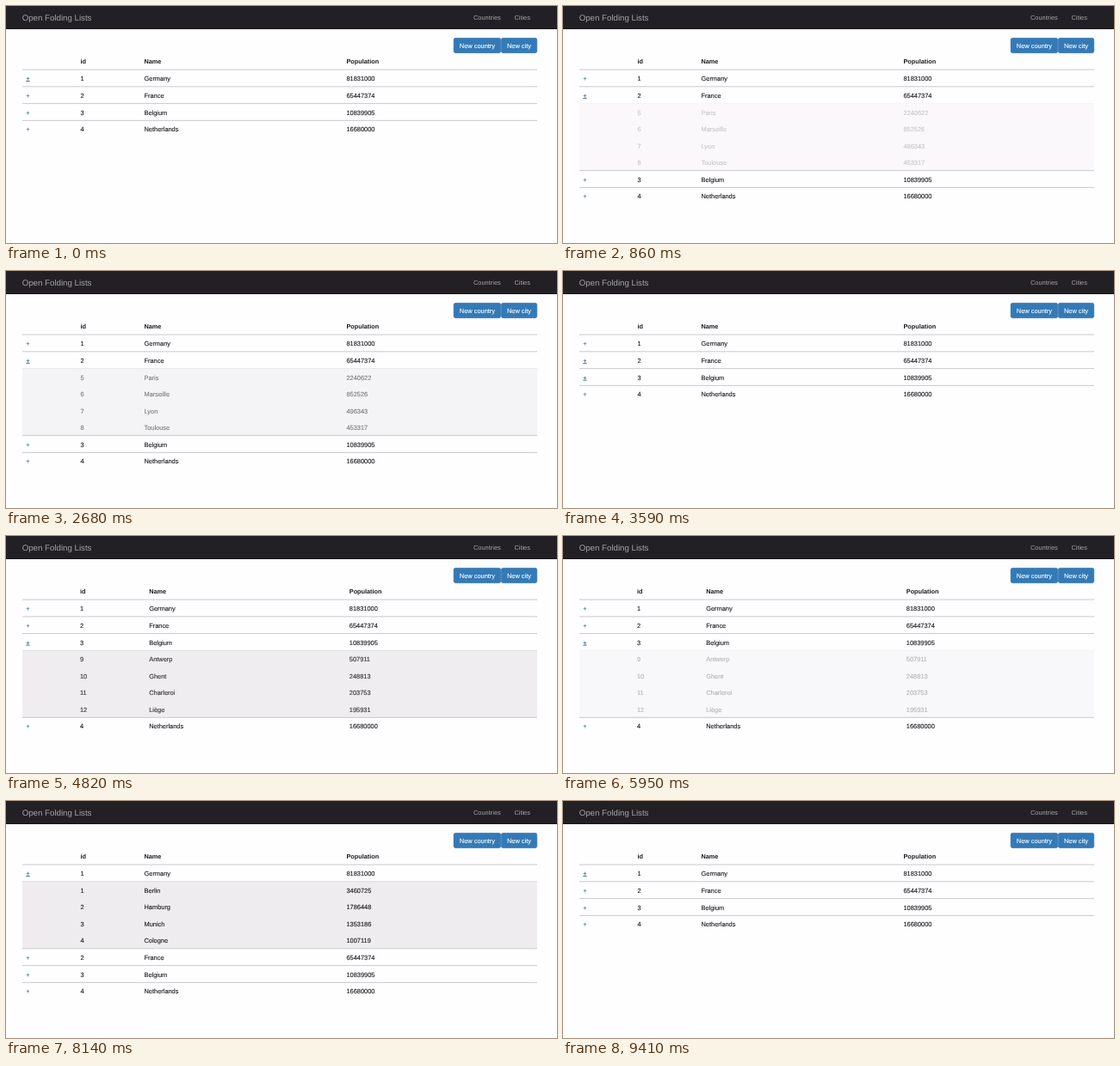
An HTML page that plays this animation: 640x276 px, repeating every 9.72 s.

```html
<!DOCTYPE html>
<html lang="en">
<head>
<meta charset="utf-8">
<title>Folding table</title>
<style>
  html, body { margin: 0; width: 100%; height: 100%; overflow: hidden; background: #fefdff; }
  svg { display: block; width: 100%; height: 100%; }
  text {
    font: 7.42px "Liberation Sans", Arial, sans-serif;
    fill: #1c1b1d; stroke: #1c1b1d; stroke-width: 0.12;
    text-rendering: geometricPrecision; white-space: pre;
  }
  .head { font-size: 7.3px; font-weight: bold; stroke: none; }
  .nav { fill: #a5a4a6; stroke: none; }
  .brand { font-size: 9.7px; }
  .label { fill: #fff; stroke: #fff; text-anchor: middle; }
  .link { fill: #35708a; stroke: #35708a; }
  .active { fill: #23527c; stroke: #23527c; }
</style>
</head>
<body>
<svg id="stage" viewBox="0 0 640 276"></svg>
<script>
const LOOP = 9720, FADE = 400;
const LEFT = 19, WIDTH = 598, TOP = 74, ROW = 19.75, SUBROW = 19.5, BASE = 13;

const countries = [
  { cells: [1, 'Germany', 81831000], cities: [
    [1, 'Berlin', 3460725], [2, 'Hamburg', 1786448], [3, 'Munich', 1353186], [4, 'Cologne', 1007119]],
    open: 7270, close: 8860, active: [[0, 730], [6550, LOOP]] },
  { cells: [2, 'France', 65447374], cities: [
    [5, 'Paris', 2240622], [6, 'Marseille', 852526], [7, 'Lyon', 496343], [8, 'Toulouse', 453317]],
    open: 730, close: 2500, active: [[50, 4270]] },
  { cells: [3, 'Belgium', 10839905], cities: [
    [9, 'Antwerp', 507911], [10, 'Ghent', 248813], [11, 'Charleroi', 203753], [12, 'Liège', 195931]],
    open: 4500, close: 5730, fadeOut: 360, wide: true, active: [[3360, 7270]] },
  { cells: [4, 'Netherlands', 16680000], cities: [], active: [] }
];

const stage = document.getElementById('stage');
const columns = [];

function add(parent, tag, attrs, content) {
  const el = document.createElementNS('http://www.w3.org/2000/svg', tag);
  for (const key in attrs) el.setAttribute(key, attrs[key]);
  if (content !== undefined) el.textContent = content;
  parent.appendChild(el);
  return el;
}

const rect = (parent, x, y, width, height, fill, more) =>
  add(parent, 'rect', { x, y, width, height, fill, ...more });

const text = (parent, x, y, content, cls = '') =>
  add(parent, 'text', { x, y, class: cls }, content);

function addCells(parent, y, cells, cls) {
  cells.forEach((cell, i) => {
    columns.push({ el: text(parent, 0, y, cell, cls), i });
  });
}

function addButton(x, width, label) {
  rect(stage, x + 0.25, 37.35, width - 0.5, 17.3, '#337ab7',
    { rx: 2.1, stroke: '#2e6da4', 'stroke-width': 0.5 });
  text(stage, x + width / 2, 48.5, label, 'label');
}

function build() {
  rect(stage, 0, 0, 640, 27, '#222024');
  rect(stage, 0, 26.4, 640, 0.6, '#0c0b0d');
  text(stage, 18.7, 16.6, 'Open Folding Lists', 'nav brand');
  text(stage, 543, 16, 'Countries', 'nav');
  text(stage, 590.4, 16, 'Cities', 'nav');
  addButton(519.8, 55.2, 'New country');
  addButton(575, 42, 'New city');
  addCells(stage, 67, ['id', 'Name', 'Population'], 'head');

  for (const c of countries) {
    c.row = add(stage, 'g', {});
    rect(c.row, LEFT, -0.4, WIDTH, 1, '#cac9cb');
    c.link = text(c.row, 23.3, BASE, '+');
    c.line = rect(c.row, 23.2, 13.2, 4.5, 0.8, '#23527c');
    addCells(c.row, BASE, c.cells);

    c.nest = add(stage, 'g', {});
    if (!c.cities.length) continue;
    rect(c.nest, LEFT, 0, WIDTH, c.cities.length * SUBROW, '#eeecef');
    rect(c.nest, LEFT, -0.4, WIDTH, 0.8, '#d6d4d7');
    c.cities.forEach((cells, i) => addCells(c.nest, i * SUBROW + BASE, cells));
  }
  // Row rules stay above the shaded blocks.
  for (const c of countries) stage.appendChild(c.row);
}

const swing = p => 0.5 - Math.cos(Math.PI * Math.min(1, Math.max(0, p))) / 2;

// Rows take their full height at once; only their opacity is eased.
function draw(t) {
  let y = TOP, wide = false;
  for (const c of countries) {
    const fadeOut = c.fadeOut || FADE;
    const shown = t >= c.open && t < c.close + fadeOut;
    const active = c.active.some(([from, to]) => t >= from && t < to);

    c.row.setAttribute('transform', `translate(0 ${y})`);
    c.link.setAttribute('class', active ? 'active' : 'link');
    c.line.setAttribute('visibility', active ? 'visible' : 'hidden');
    y += ROW;

    c.nest.setAttribute('display', shown ? 'inline' : 'none');
    if (shown) {
      c.nest.setAttribute('transform', `translate(0 ${y})`);
      c.nest.setAttribute('opacity',
        swing((t - c.open) / FADE) * (1 - swing((t - c.close) / fadeOut)));
      y += c.cities.length * SUBROW;
      wide = wide || !!c.wide;
    }
  }
  // Two-digit ids widen the first column.
  const x = wide ? [86, 166.2, 398.8] : [86.4, 160.5, 395.5];
  for (const { el, i } of columns) el.setAttribute('x', x[i]);
}

build();
const start = performance.now();
function tick() {
  draw((performance.now() - start) % LOOP);
  requestAnimationFrame(tick);
}
tick();
</script>
</body>
</html>
```
